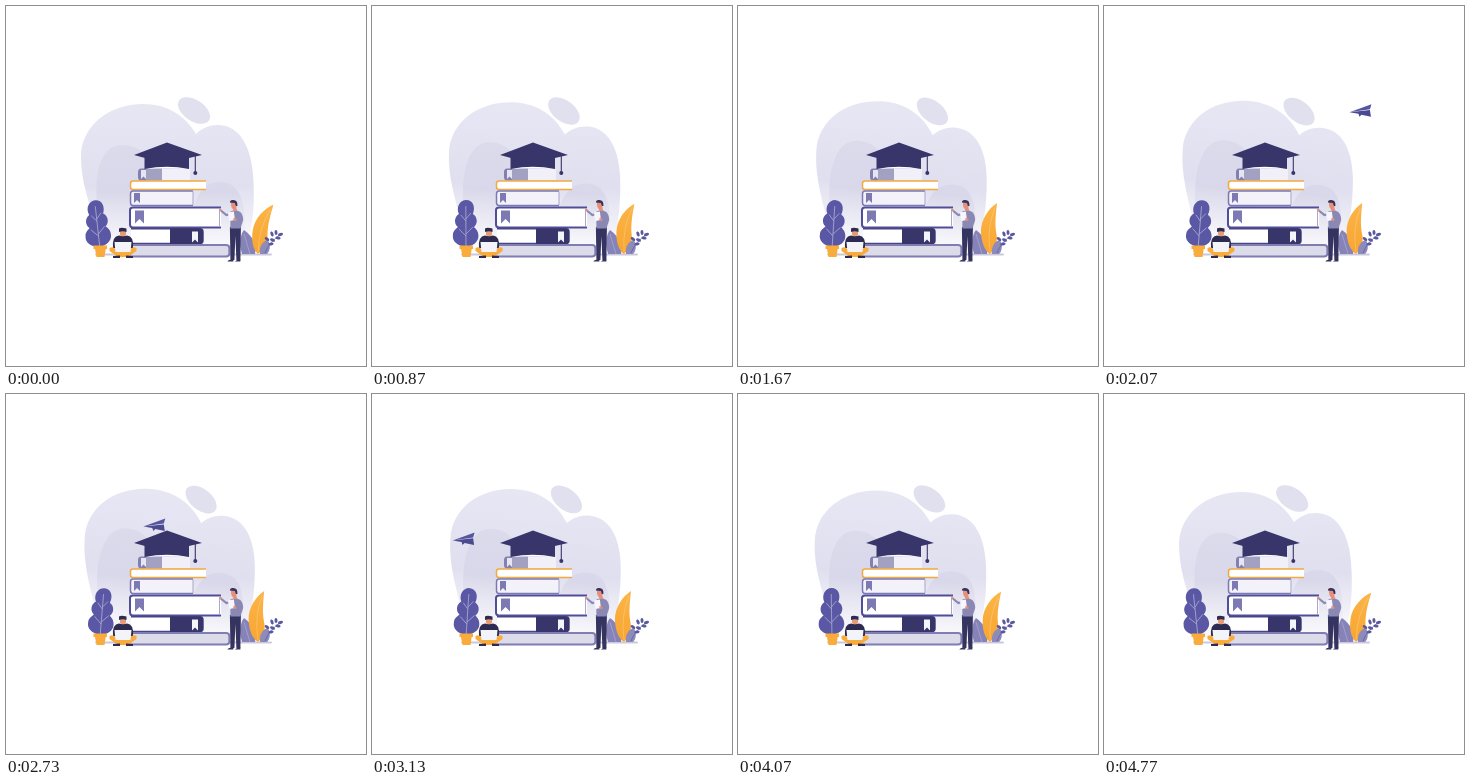
Animation, 360 px wide and 360 px high, one loop 4810 ms. Source, as an HTML page:

```html
<!DOCTYPE html>
<html lang="en">
<head>
<meta charset="utf-8">
<title>Learning</title>
<style>
  html, body { margin: 0; width: 100%; height: 100%; overflow: hidden; background: #fff; }
  svg { display: block; width: 100vw; height: 100vh; }
</style>
</head>
<body>
<svg viewBox="0 0 360 360">
  <defs>
    <linearGradient id="sky" gradientUnits="userSpaceOnUse" x1="0" y1="96" x2="0" y2="248">
      <stop offset="0" stop-color="#e7e7f4"/>
      <stop offset=".55" stop-color="#e0dfef"/>
      <stop offset="1" stop-color="#fff"/>
    </linearGradient>
    <linearGradient id="hill" gradientUnits="userSpaceOnUse" x1="0" y1="136" x2="0" y2="248">
      <stop offset="0" stop-color="#dcdbec"/>
      <stop offset=".45" stop-color="#d9d8ea"/>
      <stop offset="1" stop-color="#fff"/>
    </linearGradient>
    <linearGradient id="gold" x1="0" y1="0" x2="0" y2="1">
      <stop offset="0" stop-color="#fbb548"/>
      <stop offset="1" stop-color="#f8a530"/>
    </linearGradient>
  </defs>

  <g id="cloud">
    <path fill="url(#sky)" d="M100 248C86 205 75 180 75 151C75 120 103 98 137 98C163 98 180 111 190 128
      C196 122 204 118.500 213 119C235 120 245 143 247 168C249 195 248 220 238 248Z"/>
    <path fill="url(#hill)" d="M102 248C84 195 86 139 116 139C135 139 147 153 151 180L160 248Z"/>
    <path fill="url(#hill)" d="M180 248C184 192 195 176 214 176C236 176 243 200 236 248Z"/>
    <ellipse cx="188" cy="104.500" rx="18" ry="10.500" transform="rotate(34 188 104.5)" fill="#e1e0ef"/>
  </g>

  <g id="plane">
    <path fill="#5755a0" d="M-12 2L10 -6L8.500 -1Z"/>
    <path fill="#4b498f" d="M-12 2L8.500 -.2L9.500 6.500L0 4.500L-2 6.500L-3 3.500Z"/>
  </g>

  <path stroke="#c9c8dd" stroke-width="1.800" stroke-linecap="round" d="M90 248.500H265"/>

  <!-- Left plant -->
  <g id="bush">
    <path fill="#5a58a5" d="M94 241C85 240 80 235 81 229C81 225 84 223 86 221C82 218 82 211 87 208
      C84 201 88 194 94.500 194C101 194 104 201 101 208C106 211 106 218 102 221C104 223 106.500 225 106.500 230C106.500 236 101 240 94 241Z"/>
    <path fill="none" stroke="#aeacd2" stroke-width=".8" d="M94 242V200M94 215L89 209M94 213L99 207M94 230L87 223M94 228L101 221"/>
  </g>
  <path fill="#f9ab3c" d="M87.500 239.500H101V243H99.700L98.500 251H90.500L89 243H87.500Z"/>

  <!-- Right plants -->
  <path fill="#8583b8" d="M236 248C233 238 234 229 238 224C247 230 251 240 249 248Z"/>
  <path stroke="#b5b3d6" stroke-width=".6" d="M238 228L244 248"/>
  <g id="leaf">
    <path fill="url(#gold)" d="M258 197C250 202 242 214 242.500 226C243 236 246 244 252 248C257 243 260 236 258 228C256 218 257 208 258 197Z"/>
    <path fill="none" stroke="#fcca80" stroke-width=".6" d="M252 246Q248 222 256 202"/>
  </g>
  <path fill="#8d8bba" d="M254 248C253 240 257 235 262 234C265 240 264 245 261 248Z"/>
  <g id="sprig" fill="#5a589f"></g>

  <!-- Books, top to bottom -->
  <g fill="#fff" stroke-width="1.500">
    <path fill="#f1f0f8" d="M156 163H184V174H156Z"/>
    <path fill="#8280b0" d="M140 162.500H135Q132 162.500 132 166V171Q132 174.500 135 174.500H140Z"/>
    <path fill="#a3a1c2" d="M140 162.500H156V174.500H140Z"/>
    <path stroke="#f3a940" d="M200 175H127Q124.500 175 124.500 177.500V181Q124.500 183.500 127 183.500H200"/>
    <path fill="#f3f2f9" stroke="#7b78b2" d="M187 185H127Q124.500 185 124.500 188V196.500Q124.500 199.500 127 199.500H187"/>
    <path stroke="#504e99" stroke-width="2" d="M215 201.500H127Q124 201.500 124 204V218.500Q124 221.500 127 221.500H215"/>
    <path stroke="#a9a7cc" stroke-width="1" d="M213.500 202.500V220.500M187 185.500V199"/>
    <path stroke="#474583" d="M125 222.800H194Q197 222.800 197 226V234.500Q197 237.500 194 237.500H125"/>
    <path fill="#38356a" d="M164 222.500H194Q197 222.500 197 226V234.500Q197 238 194 238H164Z"/>
    <path fill="#dcdbea" stroke="#7f7db2" stroke-width="1.900" d="M124 239H220Q223.300 239 223.300 242V247.500Q223.300 250.500 220 250.500H124"/>
  </g>
  <g id="bookmarks"></g>

  <!-- Cap -->
  <path fill="#fff" d="M139 163Q161 157 183 163Q161 161 139 163Z"/>
  <g fill="#38356a">
    <path d="M138.500 147H183V163Q161 158.500 138.500 163Z"/>
    <path d="M128 149L161 136.500L196 149L183 152H139Z"/>
    <path stroke="#38356a" stroke-width="1.100" d="M189.300 149V166"/>
    <circle cx="189.300" cy="167" r="2"/>
  </g>

  <!-- Reader with laptop -->
  <g fill="#2d2c50">
    <path fill="#e99a71" d="M114 224H120V229Q117 231.500 114 229Z"/>
    <path d="M113 226V222.500Q115 221 120.500 222.500V226Q117 224.500 113 226Z"/>
    <path d="M107 242Q106 230 113 229.500Q117 231 121 229.500Q128 230 127 242Z"/>
    <path fill="#f9ab3c" d="M103.500 242Q108 240 110 244H124Q126 240 130.500 242V245L122 251H112L103.500 245Z"/>
    <path fill="#f3f3fa" d="M108.500 236H125.500L124.500 246H109.500Z"/>
    <path d="M107 250L114 249.500V252H107ZM127 250L120 249.500V252H127Z"/>
  </g>

  <!-- Standing figure -->
  <g fill="#35335f" transform="translate(-.6 0)">
    <path d="M224.500 221H235.500L235 254H231L230 230L229 254H225Z"/>
    <path d="M222 255.500Q222.500 253.500 228 253.500V255.500ZM229.500 255.500Q231 253.500 235 253.500V255.500Z"/>
    <path fill="none" stroke="#8a88b4" stroke-width="2.200" stroke-linecap="round" d="M225 208L221 209L216 205"/>
    <path fill="#8a88b4" d="M225 205.500Q230 203.500 235 206Q238.500 210 237.500 215L235 222.500H225Z"/>
    <path fill="#e79077" d="M225.500 196H231V202L232 205H228L227.500 203Q225.500 202 225.500 196Z"/>
    <path d="M224.500 196.500Q224.500 193.500 228 194Q232.500 194 232 200L230.500 200L229.500 197Z"/>
    <path fill="#f6f6fc" d="M222.500 206.500L228.500 205.500L229.500 214L224 215Z"/>
    <path fill="#e79077" d="M228 212L231 212.500V215L228 214.500Z"/>
    <circle cx="215" cy="204" r="1.200" fill="#e79077"/>
  </g>
</svg>
<script>
const LOOP = 4810;
const byId = id => document.getElementById(id);

const bookmark = (x, y, w, h, color) =>
  `<path fill="${color}" d="M${x} ${y}h${w}v${h}l${-w / 2} ${-w / 2}l${-w / 2} ${w / 2}z"/>`;
byId("bookmarks").innerHTML =
  bookmark(135, 164, 5, 9, "#e6e5f2") +
  bookmark(128, 187, 6, 10, "#7d7ab3") +
  bookmark(129, 204.5, 9, 13, "#7d7ab3") +
  bookmark(186, 225.5, 6, 11, "#f4f4fb");

const berry = ([x, y, angle]) =>
  `<ellipse cx="${x}" cy="${y}" rx="2.6" ry="1.5" transform="rotate(${angle} ${x} ${y})"/>`;
byId("sprig").innerHTML =
  '<path fill="none" stroke="#5a589f" stroke-width=".7" d="M259 247Q263 236 275 228"/>' +
  [[261, 233, 35], [266, 228, 70], [270, 226.5, 85], [274.5, 228.5, -15], [272, 232, 10], [266.5, 234, 20], [265, 238, -10]]
    .map(berry).join("");

const rotate = (id, angle, x, y) =>
  byId(id).setAttribute("transform", `rotate(${angle} ${x} ${y})`);
const clamp = v => Math.min(1, Math.max(0, v));

function flyPlane(t) {
  const start = 1800, end = 3370, fade = 130;
  const p = clamp((t - start) / (end - start));
  const eased = (1 - Math.cos(Math.PI * p)) / 2;
  const plane = byId("plane");
  plane.setAttribute("transform", `translate(${271 - 189 * eased} ${101 + 46 * eased})`);
  plane.setAttribute("opacity", clamp(Math.min(t - start, end - t) / fade));
}

function draw(now) {
  const t = now % LOOP;
  const sway = Math.sin(Math.PI * t / LOOP);
  rotate("cloud", 4.6 * sway, 178, 195);
  rotate("bush", -6.3 + 11.3 * sway, 94, 243);
  rotate("leaf", 11 * (1 - sway), 253, 247);
  flyPlane(t);
  requestAnimationFrame(draw);
}
requestAnimationFrame(draw);
</script>
</body>
</html>
```
